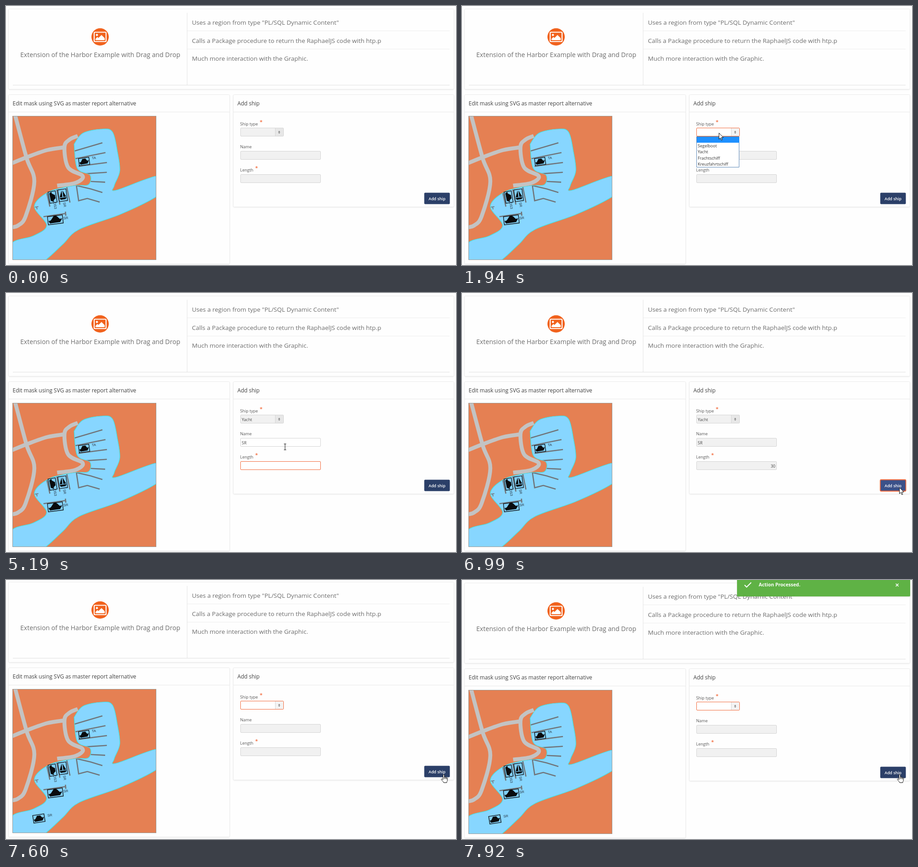
Recreate the animation shown at these times as an HTML page with a canvas. Size 985x568 px, loop 8 s.

```html
<!DOCTYPE html>
<html lang="en">
<head>
<meta charset="utf-8">
<title>Harbor editor</title>
<style>
html, body { margin: 0; width: 100%; height: 100%; overflow: hidden; background: #fefefe; }
canvas { display: block; }
</style>
</head>
<body>
<canvas id="stage" width="985" height="568"></canvas>
<script>
const ctx = document.getElementById('stage').getContext('2d');
const LOOP = 8000;
const SANS = '"Open Sans", "Noto Sans", sans-serif';
const ORANGE = '#f2693a', BACK = '#fefefe', BLACK = '#0a0c0e';

// ---------- helpers ----------
function text(str, x, y, size, color, opt = {}) {
  ctx.font = `${opt.weight || 400} ${size}px ${opt.family || SANS}`;
  ctx.textAlign = opt.align || 'left';
  ctx.fillStyle = color;
  ctx.fillText(str, x, y);
}

function rect(x, y, w, h, color) {
  ctx.fillStyle = color;
  ctx.fillRect(x, y, w, h);
}

function box(x, y, w, h, r, fill, stroke, line = 1) {
  ctx.beginPath();
  ctx.roundRect(x, y, w, h, r);
  if (fill) { ctx.fillStyle = fill; ctx.fill(); }
  if (stroke) { ctx.strokeStyle = stroke; ctx.lineWidth = line; ctx.stroke(); }
}

function dot(x, y, r, fill) {
  ctx.beginPath();
  ctx.arc(x, y, r, 0, 7);
  ctx.fillStyle = fill;
  ctx.fill();
}

function trace(...pts) {
  ctx.beginPath();
  pts.forEach(p => ctx.lineTo(...p));
}

function line(...pts) {
  trace(...pts);
  ctx.stroke();
}

function poly(fill, ...pts) {
  trace(...pts);
  ctx.fillStyle = fill;
  ctx.fill();
}

function placed(x, y, deg, paint) {
  ctx.save();
  ctx.translate(x, y);
  ctx.rotate(deg * Math.PI / 180);
  paint();
  ctx.restore();
}

function shadow(alpha, paint) {
  ctx.save();
  ctx.shadowColor = `rgba(0,0,0,${alpha})`;
  ctx.shadowBlur = 3;
  ctx.shadowOffsetY = 1;
  paint();
  ctx.restore();
}

// Catmull-Rom curve through all points.
function spline(pts) {
  const at = i => pts[Math.max(0, Math.min(pts.length - 1, i))];
  const path = new Path2D();
  path.moveTo(...pts[0]);
  for (let i = 0; i < pts.length - 1; i++) {
    const [a, b, c, d] = [at(i - 1), at(i), at(i + 1), at(i + 2)];
    path.bezierCurveTo(
      b[0] + (c[0] - a[0]) / 6, b[1] + (c[1] - a[1]) / 6,
      c[0] - (d[0] - b[0]) / 6, c[1] - (d[1] - b[1]) / 6, ...c);
  }
  return path;
}

// ---------- map ----------
const water = spline([
  [149, 303], [168, 279], [208, 270], [233, 276], [244, 320], [249, 362], [237, 394], [241, 404],
  [329, 373], [360, 385], [329, 418], [250, 457], [160, 490], [125, 522], [88, 556],
  [40, 590], [0, 560], [14, 519], [60, 504], [89, 481], [62, 439], [95, 407],
  [150, 394], [180, 392], [184, 371], [156, 356], [149, 303]
]);
const roads = [
  [[19, 236], [45, 333], [62, 385], [43, 461], [27, 481], [10, 486]],
  [[10, 346], [47, 331], [90, 316], [127, 310]],
  [[157, 285], [139, 293], [128, 309], [136, 354], [168, 373], [152, 388], [112, 394]]
].map(spline);

function piers() {
  ctx.strokeStyle = '#70757a';
  ctx.lineWidth = 2.6;
  for (let i = 0; i < 5; i++)
    line([150 + 2.2 * i * i, 318 + 16.7 * i], [211 + 8.5 * i - 1.75 * i * i, 300 + 21.6 * i]);
  for (let i = 0; i < 3; i++)
    line([89 + 22 * i, 408 - 5.5 * i], [96 + 22 * i, 440 - 4.5 * i]);
  line([155, 394], [185, 401], [211, 409]);
  line([154, 393], [159, 427], [178, 422], [205, 430]);
  line([82, 462], [131, 455]);
  line([130, 451], [131, 460]);
  ctx.lineWidth = 1.6;
  line([63, 441], [71, 440]);
  line([67, 440], [68, 446]);
}

// Motor vessel: a hull with stacked decks, sized by its frame.
function motorShip(w, h, decks) {
  poly(BLACK, [-.46 * w, .05 * h], [.46 * w, -.08 * h], [.3 * w, .33 * h], [-.38 * w, .36 * h]);
  for (let i = 0; i < decks; i++) {
    const half = w * (.34 - .1 * i), y = -h * .17 * i;
    poly(BLACK, [-half, y + 1], [-half * .6, y - .2 * h], [half * .7, y - .2 * h], [half, y + 1]);
  }
}

function sailBoat(w, h) {
  for (const side of [-1, 1])
    poly(BLACK, [side, -.4 * h], [side * .4 * w, .15 * h], [side, .15 * h]);
  poly(BLACK, [-.44 * w, .2 * h], [.44 * w, .2 * h], [.28 * w, .36 * h], [-.28 * w, .36 * h]);
}

function ship(x, y, w, h, deg, decks) {
  placed(x, y, deg, () => {
    box(-w / 2, -h / 2, w, h, 0, '#80cdf4', BLACK, 1.3);
    if (decks) motorShip(w, h, decks);
    else sailBoat(w, h);
  });
}

function tag(str, x, y, deg) {
  placed(x, y, deg, () =>
    text(str, 0, 0, 7.5, '#26313a', { family: '"Liberation Sans", Arial, sans-serif' }));
}

function drawMap(added) {
  ctx.save();
  ctx.beginPath();
  ctx.rect(14, 241, 315, 316);
  ctx.clip();
  rect(14, 241, 315, 316, '#e58053');
  ctx.fillStyle = '#87d6ff';
  ctx.fill(water);
  ctx.save();
  ctx.clip(water);
  piers();
  ctx.restore();
  ctx.strokeStyle = '#3fe3e6';
  ctx.lineWidth = 1.2;
  ctx.stroke(water);
  ctx.strokeStyle = '#c3c3c3';
  ctx.lineWidth = 8.5;
  roads.forEach(r => ctx.stroke(r));
  ship(171, 341, 23, 16, -8, 2);
  ship(102, 419, 25, 16, 80, 2);
  ship(124, 415, 18, 26, -8, 0);
  ship(108, 469, 33, 18, -7, 3);
  tag('TA', 188, 336, -4);
  tag('DS3', 104, 431, 82);
  tag('SR', 125, 431, 80);
  tag('SR', 126, 468, -6);
  if (added) {
    ship(72, 525, 25, 17, -9, 2);
    tag('SR', 91, 521, -6);
  }
  ctx.restore();
  box(14.5, 241.5, 314, 315, 0, null, '#9a9a94');
}

// ---------- page ----------
function card(x, y, w, h, title) {
  shadow(.1, () => box(x + .5, y + .5, w - 1, h - 1, 2, BACK));
  box(x + .5, y + .5, w - 1, h - 1, 2, null, '#ececec');
  if (!title) return;
  rect(x + 1, y + 38, w - 2, 1, '#e8e8e8');
  text(title, x + 9.5, y + 24, 11.95, '#404040');
}

function pictureIcon() {
  dot(206, 67.8, 19, '#f1621d');
  box(193, 57.5, 26, 20.5, 1.5, null, '#fff', 2.2);
  dot(199, 63.5, 2.3, '#fff');
  poly('#fff', [196, 75], [196, 72], [200, 68], [202.5, 70], [209, 63.5], [216, 70.5], [216, 75]);
}

function intro() {
  const gray = '#6d6d6d';
  card(5, 6, 976, 177);
  rect(396, 15, 1, 159, '#e4e4e4');
  rect(15, 173, 956, 1, '#e0e0e0');
  pictureIcon();
  text('Extension of the Harbor Example with Drag and Drop', 206.3, 112, 14.15, gray, { align: 'center' });
  [
    'Uses a region from type "PL/SQL Dynamic Content"',
    'Calls a Package procedure to return the RaphaelJS code with htp.p',
    'Much more interaction with the Graphic.'
  ].forEach((str, i) => {
    text(str, 407, 41 + 39.5 * i, 13.5, gray);
    if (i) rect(397, 14 + 40 * i, 574, 1, '#eeeeee');
  });
}

function label(str, y, starX) {
  text(str, 512.5, y, 9, '#555');
  if (starX) text('*', starX, y - 4.5, 11.5, ORANGE, { weight: 600 });
}

function control(y, w, focus, hover) {
  box(513.5, y + .5, w, 18, 1.5, focus || hover ? '#fff' : '#f1f1f1', focus ? ORANGE : '#d4d4d4');
}

function field(y, value, focus, hover, align) {
  control(y, 175, focus, hover);
  text(value, align ? 686 : 516, y + 13.5, 9, '#444', { align });
}

function select(value, focus) {
  control(267, 94, focus);
  rect(589, 268, 18, 17, focus ? '#f3f3f3' : '#e7e7e7');
  rect(589, 268, 1, 17, '#d6d6d6');
  for (const s of [-1, 1])
    poly('#666', [598, 276.8 + 3 * s], [600.2, 276.8 + .6 * s], [595.8, 276.8 + .6 * s]);
  text(value, 516, 281, 9, '#444');
}

function dropdown(active) {
  box(513.5, 286.5, 93, 67, 0, '#fff', '#5c88b8');
  ['', 'Segelboot', 'Yacht', 'Frachtschiff', 'Kreuzfahrtschiff'].forEach((name, i) => {
    const top = 287 + 13.3 * i;
    if (i === active) rect(514, top, 93, 12.8, '#1e90ff');
    text(name, 516, top + 9.8, 9, i === active ? '#fff' : '#333');
  });
}

function button(t, hover) {
  const leaving = t >= 7220;
  const fill = leaving || !hover ? '#2b3f68' : t >= 6900 ? '#3b5189' : t >= 6590 ? '#263961' : '#354b7b';
  box(915.5, 409.5, 56, 25, 2, fill);
  if (t >= 6590 && !leaving) box(915.5, 409.5, 56, 25, 2, null, ORANGE, t >= 6900 ? 1.8 : 1);
  text('Add ship', 943.5, 426, 8.8, '#fff', { weight: 600, align: 'center' });
}

function form(t, c, fresh) {
  const open = t >= 1940 && t < 2860;
  const typed = (str, first, second) =>
    fresh ? '' : str.slice(0, (t >= first) + (t >= second));
  label('Ship type', 262, 555.3);
  label('Name', 312.3);
  label('Length', 363, !open && 545.3);
  select(!fresh && t >= 2860 ? 'Yacht' : '', fresh || (t >= 1940 && t < 3090));
  field(318, typed('SR', 4270, 4500), t >= 3090 && t < 4660, t >= 2860 && overField(c, 318));
  field(369, typed('30', 5480, 5570), t >= 4660 && t < 5880, false, 'right');
  button(t, overButton(c));
  if (open) dropdown(Math.max(0, Math.floor((c.y - 286.5) / 13.3)));
}

function drawPage(t, c) {
  const fresh = t >= 7600;
  intro();
  card(5, 194, 485, 372, 'Edit mask using SVG as master report alternative');
  drawMap(fresh);
  card(497, 194, 484, 247, 'Add ship');
  form(t, c, fresh);
}

function drawNotice(e) {
  ctx.save();
  ctx.translate(0, -10 * (1 - e));
  ctx.globalAlpha = e;
  shadow(.15, () => box(602, -20, 379, 56, 2, 'rgba(89,176,62,.95)'));
  ctx.globalAlpha = Math.min(1, 2 * e);
  ctx.strokeStyle = '#fff';
  ctx.lineWidth = 2;
  line([618.5, 11], [623, 15.5], [633, 5.5]);
  ctx.lineWidth = 1.6;
  for (const s of [-3, 3]) line([952.5 - s, 8], [952.5 + s, 14]);
  text('Action Processed.', 649.5, 14.3, 10.4, '#fff', { weight: 700 });
  ctx.restore();
}

// ---------- pointer ----------
// Each move bends towards `via` and starts where the last one ended.
const START = [480, 552];
const MOVES = [
  { from: 190, until: 980, steps: 11, via: [1037, 510], to: [722, 285] },
  { from: 1070, until: 1780, steps: 10, via: [650, 224], to: [562, 278] },
  { from: 2250, until: 2630, steps: 6, via: [562, 298], to: [562, 317] },
  { from: 2860, until: 3090, steps: 4, via: [570, 319], to: [579, 322] },
  { from: 5190, until: 5570, steps: 6, via: [673, 367], to: [767, 411] },
  { from: 5800, until: 6130, steps: 5, via: [862, 421], to: [957, 426] }
];

function pointer(t) {
  const i = MOVES.filter(m => m.from <= t).length - 1;
  if (i < 0) return { x: 0, y: 0, on: false };
  const { from, until, steps, via, to } = MOVES[i];
  const a = i ? MOVES[i - 1].to : START;
  const step = 1 + Math.floor((t - from) / (until - from) * (steps - 1) + .01);
  const u = Math.min(1, step / steps), v = 1 - u;
  const [x, y] = [0, 1].map(k => v * v * a[k] + 2 * u * v * via[k] + u * u * to[k]);
  return { x, y, on: t < 4270 || t >= 5190 };
}

const overField = (c, y) => c.x >= 513 && c.x < 689 && c.y >= y - 1 && c.y < y + 20;
const overButton = c => c.x >= 915 && c.x < 972 && c.y >= 409 && c.y < 436;

const HAND = new Path2D('M4.5 12V2a1.4 1.4 0 0 1 2.8 0V7.5V6.5a1.4 1.4 0 0 1 2.6.4v.6a1.4 1.3 0 0 1 2.4.6a1 1 0 0 1 1.9.8V13c0 2-1.5 3-1.5 5.5H6C5.5 16 1.5 13 .7 11.2c.2-1.6 1.8-1.6 3.8.8zM7.3 7V10.5M9.9 7.5V10.5M12.3 8.2V11');
const ARROW = new Path2D('M0 0V13.6L3.1 10.7L5.3 15.8L7.3 15L5.2 10H9.6z');
const BEAM = new Path2D('M-2.5-6.5H2.5M0-6.5V6.5M-2.5 6.5H2.5');

function drawPointer(t, c) {
  if (!c.on) return;
  const typing = t >= 2860 && (overField(c, 318) || overField(c, 369));
  const hand = overButton(c) && (t < 6990 || t >= 7370);
  const shape = typing ? BEAM : hand ? HAND : ARROW;
  placed(c.x + (hand ? -5 : .5), c.y + (hand ? 0 : .5), 0, () => {
    ctx.lineWidth = 1;
    ctx.strokeStyle = '#111';
    ctx.fillStyle = '#fff';
    ctx.fill(shape);
    ctx.stroke(shape);
  });
}

// ---------- loop ----------
function draw(t) {
  const c = pointer(t);
  rect(0, 0, 985, 568, BACK);
  if (t < 7220) {
    drawPage(t, c);
  } else if (t >= 7600) {
    const u = Math.min(1, Math.floor((t - 7600) / 80) / 4);
    const e = 1 - Math.pow(1 - u, 2.4);
    placed(0, Math.round(-2 * (1 - e) - .01), 0, () => drawPage(t, c));
    drawNotice(e);
  }
  drawPointer(t, c);
}

const begin = performance.now();
function tick() {
  draw((performance.now() - begin) % LOOP);
  requestAnimationFrame(tick);
}
tick();
</script>
</body>
</html>
```
